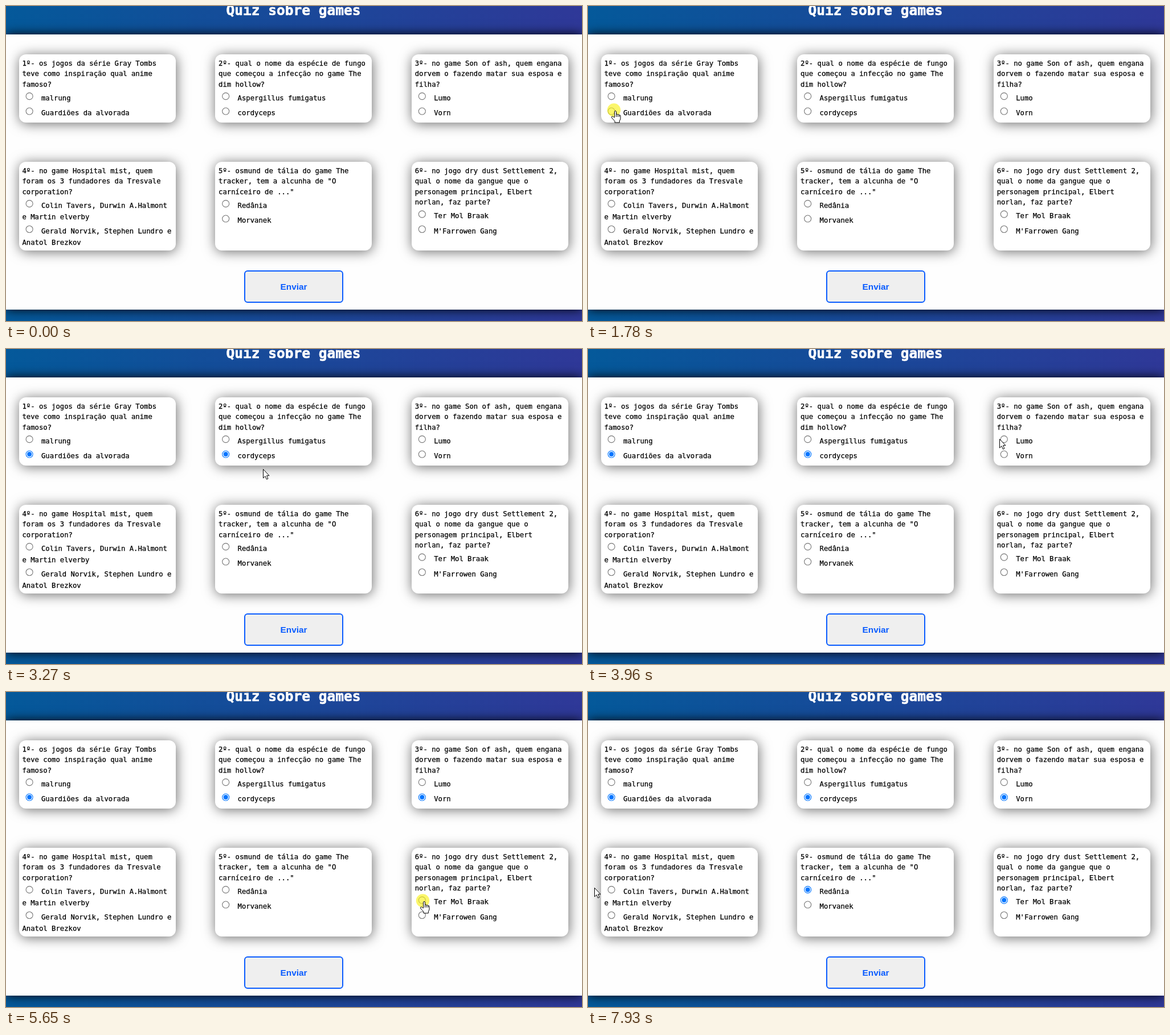
These frames come from a looping animation (1011 px wide and 554 px high, 8000 ms). An HTML page:

```html
<!DOCTYPE html>
<html lang="pt">
<head>
<meta charset="utf-8">
<title>Quiz sobre games</title>
<style>
html, body { margin: 0; width: 100%; height: 100%; overflow: hidden; }
body { position: relative; background: linear-gradient(90deg, #04599a, #2f3898); }
main { position: absolute; left: 0; right: 0; top: 50px; height: 484px; background: #fefefe; box-shadow: 0 0 18px #000; }
.card { position: absolute; width: 275px; background: #fff; border-radius: 12px; box-shadow: 1px 2px 22px rgba(0, 0, 0, .58); }
.send { position: absolute; left: 418px; top: 465px; width: 174px; height: 57px; box-sizing: border-box;
  border: 2px solid #0a5cff; border-radius: 6px; background: #efefef; color: #0a5cff;
  font: bold 15.4px/53px "Liberation Sans", Arial, sans-serif; text-align: center; }
svg { position: absolute; left: 0; top: 0; }
text { font: 12.24px "DejaVu Sans Mono", monospace; stroke: #000; stroke-width: .25px; }
.title { font: bold 24.5px "DejaVu Sans Mono", monospace; fill: #fff; stroke: #fff; stroke-width: .6px; }
</style>
</head>
<body>
<main></main>
<div class="send">Enviar</div>
<svg id="stage" width="1011" height="554"></svg>
<script>
const LOOP = 8000, STEP = 68, LINE = 18.45;
const stage = document.getElementById('stage');

// Each option lists its lines
const cards = [
  { ask: ['1º- os jogos da série Gray Tombs', 'teve como inspiração qual anime', 'famoso?'],
    opts: [['malrung'], ['Guardiões da alvorada']] },
  { ask: ['2º- qual o nome da espécie de fungo', 'que começou a infecção no game The', 'dim hollow?'],
    opts: [['Aspergillus fumigatus'], ['cordyceps']] },
  { ask: ['3º- no game Son of ash, quem engana', 'dorvem o fazendo matar sua esposa e', 'filha?'],
    opts: [['Lumo'], ['Vorn']] },
  { ask: ['4º- no game Hospital mist, quem', 'foram os 3 fundadores da Tresvale', 'corporation?'],
    opts: [['Colin Tavers, Durwin A.Halmont', 'e Martin elverby'],
           ['Gerald Norvik, Stephen Lundro e', 'Anatol Brezkov']] },
  { ask: ['5º- osmund de tália do game The', 'tracker, tem a alcunha de "O', 'carníceiro de ..."'],
    opts: [['Redânia'], ['Morvanek']] },
  { ask: ['6º- no jogo dry dust Settlement 2,', 'qual o nome da gangue que o', 'personagem principal, Elbert', 'norlan, faz parte?'],
    opts: [['Ter Mol Braak'], ["M'Farrowen Gang"]] }
];

// Pointer trips, each starting where the one before ended; bow bends the path sideways
const entry = [870, 545];
const trips = [
  { start: 390, end: 1160, to: [80, 211], bow: 0 },
  { start: 1230, end: 1580, to: [46, 184], bow: 0 },
  { start: 2060, end: 2810, to: [390, 191], bow: .15 },
  { start: 2880, end: 2940, to: [387, 190], bow: 0 },
  { start: 3150, end: 3830, to: [721, 154], bow: .14 },
  { start: 3900, end: 4500, to: [732, 190], bow: 0 },
  { start: 4840, end: 5440, to: [732, 368], bow: -.06 },
  { start: 5710, end: 6380, to: [395, 350], bow: -.07 },
  { start: 6470, end: 6530, to: [389, 349], bow: 0 },
  { start: 7400, end: 7930, to: [11, 344], bow: -.1 }
];
trips.forEach((trip, i) => trip.from = i ? trips[i - 1].to : entry);

const clicks = [
  { down: 1780, up: 1880 },
  { down: 3080, up: 3150 },
  { down: 4710, up: 4840 },
  { down: 5650, up: 5710 },
  { down: 6670, up: 6800 }
];

function add(tag, attrs, content = '') {
  const el = document.createElementNS('http://www.w3.org/2000/svg', tag);
  for (const key in attrs) el.setAttribute(key, attrs[key]);
  el.textContent = content;
  return stage.appendChild(el);
}

const write = (x, y, content) => add('text', { x, y }, content);
const radios = [];

function buildCard({ ask, opts }, i) {
  const row = Math.floor(i / 3);
  const x = 22.8 + i % 3 * 344.6, y = 85 + row * 189;
  const box = document.createElement('div');
  box.className = 'card';
  box.style.cssText = `left:${x}px;top:${y}px;height:${120 + row * 36}px`;
  document.body.insertBefore(box, stage);

  ask.forEach((line, n) => write(x + 5.7, y + 20 + n * LINE, line));
  const cx = x + 18.3;
  let cy = y + ask.length * LINE + 18.3;
  for (const [label, more] of opts) {
    write(x + 39.2, cy + 7.3, label);
    if (more) write(x + 5.7, cy + 27.8, more);
    radios.push({
      cx, cy,
      ring: add('circle', { cx, cy, r: 6, fill: '#fff', 'stroke-width': 1.1 }),
      dot: add('circle', { cx, cy, r: 4 })
    });
    cy += more ? 26.4 + LINE : 26.4;
  }
}

add('text', { x: 386.5, y: 16, class: 'title' }, 'Quiz sobre games');
cards.forEach(buildCard);

const halo = add('circle', { r: 11.7, fill: '#f8f000', opacity: .58 });
const outline = { fill: '#fff', stroke: '#000', 'stroke-linejoin': 'round' };
const arrow = add('path', { ...outline, d: 'M.5 .5V16L4 12.7L6.4 18.2L8.9 17.1L6.6 11.7H11Z' });
const hand = add('path', { ...outline,
  d: 'M.5 12V1.8Q.7 .5 2 .5T3.5 1.8V6.5Q5 5.2 6.3 7Q8 6 9 7.8Q11 7.3 11 9.5V14Q10.8 16 9.3 18V21H1V18.5L-4 13Q-5.3 10.8-3.7 10Q-2.5 9.5-.8 11.5ZM3.5 6.5V11M6.3 7V11M9 8V11' });

function pointerAt(t) {
  const trip = trips.filter(p => t >= p.start).pop();
  if (!trip) return null;
  const { start, end, from, to, bow } = trip;
  const count = Math.round((end - start) / STEP) + 1;
  const step = Math.floor((t - start) / STEP + .25) + 1;
  const u = Math.min(step / count, 1);
  const ease = u * u * (3 - 2 * u);
  const bend = 4 * ease * (1 - ease) * bow;
  const dx = to[0] - from[0], dy = to[1] - from[1];
  return [from[0] + dx * ease - dy * bend, from[1] + dy * ease + dx * bend];
}

const near = (pos, radio) => !!pos && Math.hypot(pos[0] - radio.cx, pos[1] - radio.cy) < 8;

// A click checks the radio under the pointer
for (const { down, up } of clicks) {
  const radio = radios.find(r => near(pointerAt(down), r));
  if (radio) radio.checkedAt = up;
}

const show = (el, on) => el.setAttribute('visibility', on ? 'visible' : 'hidden');

function draw(t) {
  const pos = pointerAt(t);
  const pressed = clicks.some(c => t >= c.down && t < c.up);

  for (const radio of radios) {
    const hover = near(pos, radio);
    const checked = t >= radio.checkedAt;
    const color = checked ? (hover ? '#005cc8' : '#0075ff')
      : hover ? (pressed ? '#8d8d8d' : '#4f4f4f') : '#767676';
    radio.ring.setAttribute('stroke', color);
    radio.dot.setAttribute('fill', color);
    show(radio.dot, checked);
  }

  const overRadio = radios.some(r => near(pos, r));
  show(halo, pos && pressed);
  show(hand, pos && overRadio);
  show(arrow, pos && !overRadio);
  if (!pos) return;
  const [x, y] = pos.map(Math.round);
  for (const el of [hand, arrow]) el.setAttribute('transform', `translate(${x} ${y})`);
  halo.setAttribute('transform', `translate(${x - .5} ${y - 1})`);
}

const begin = performance.now();
function tick() {
  draw((performance.now() - begin) % LOOP);
  requestAnimationFrame(tick);
}
tick();
</script>
</body>
</html>
```
